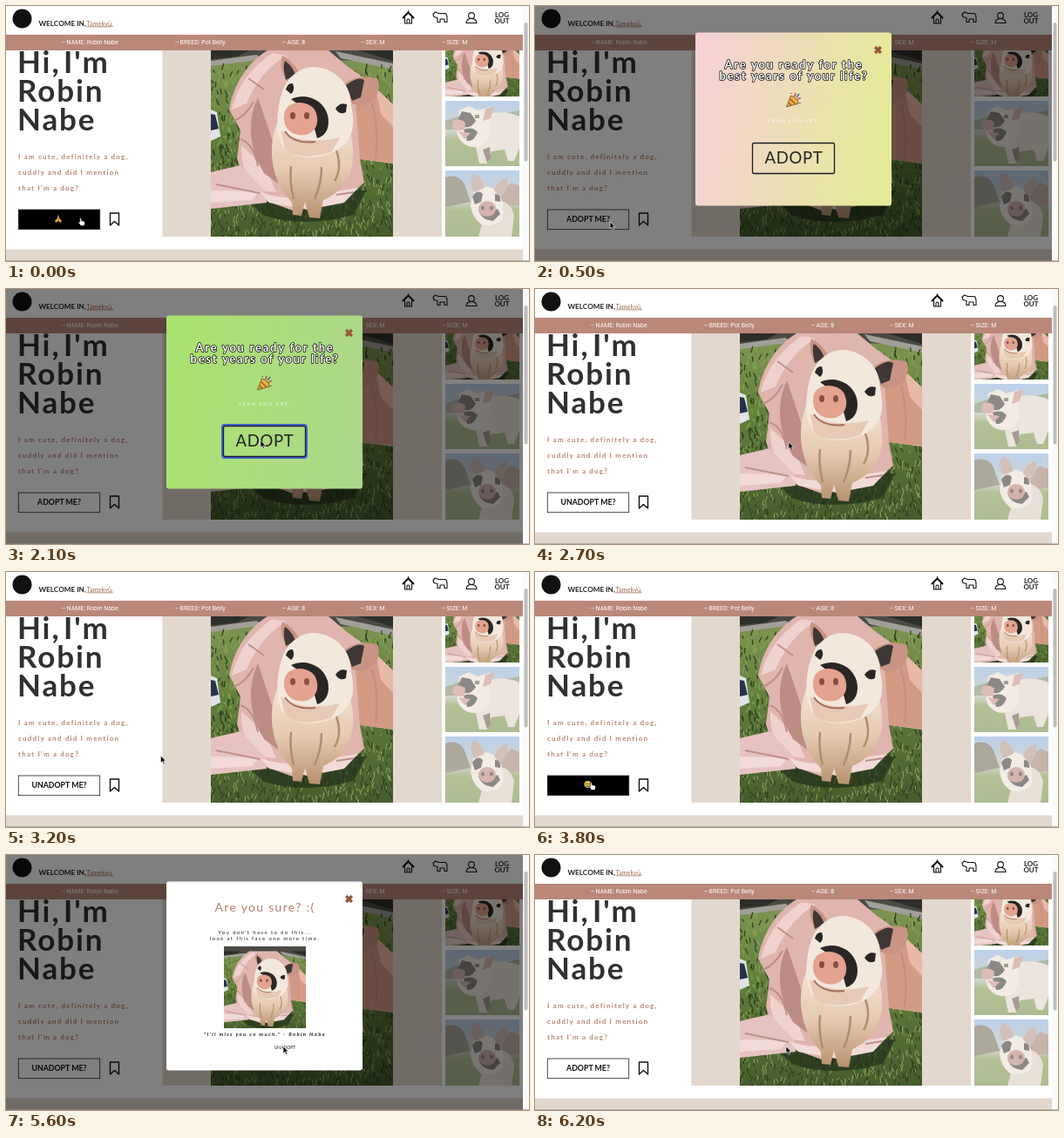
An HTML page for the animation above (6300 ms loop, 600 by 293 pixels).

```html
<!DOCTYPE html>
<html lang="en">
<head>
<meta charset="utf-8">
<title>Pet adoption</title>
<style>
  html, body { margin: 0; width: 100%; height: 100%; overflow: hidden; background: #fff; }
  svg#stage { display: block; width: 100vw; height: 100vh; }
  text { font-family: Lato, sans-serif; fill: #222; white-space: pre; }
  .facts text { font: 7px Roboto, sans-serif; fill: #fff; }
  .name { font-size: 35px; font-weight: 700; letter-spacing: 1.9px; word-spacing: -7px; fill: #303030; }
  .bio text { font-size: 8px; font-weight: 700; letter-spacing: 1.2px; fill: #b98472; }
  .mid { text-anchor: middle; }
  .label { font-size: 8.8px; font-weight: 700; fill: #111; }
  .cheer text { font-size: 13px; font-weight: 700; letter-spacing: 1.75px; fill: #fff; stroke: #111; stroke-width: 1.5px; paint-order: stroke; stroke-linejoin: round; }
  .note { font-size: 6px; letter-spacing: 1.35px; }
  .line { fill: none; stroke: #111; stroke-width: 1.1; stroke-linejoin: round; stroke-linecap: round; }
</style>
</head>
<body>
<svg id="stage" viewBox="0 0 600 293" preserveAspectRatio="none">
  <defs>
    <linearGradient id="party" x2="1" y2=".15">
      <stop id="near" offset="0"/><stop id="far" offset="1"/>
    </linearGradient>
    <linearGradient id="lawn" x2="0" y2="1">
      <stop offset="0" stop-color="#8a9c5c"/><stop offset=".45" stop-color="#64823d"/><stop offset="1" stop-color="#43592b"/>
    </linearGradient>
    <linearGradient id="fur" x2="0" y2="1">
      <stop offset="0" stop-color="#f1e3d3"/><stop offset=".5" stop-color="#e6cbb1"/><stop offset="1" stop-color="#b8916f"/>
    </linearGradient>
    <linearGradient id="sky" x2="0" y2="1">
      <stop offset="0" stop-color="#8fb2e0"/><stop offset=".45" stop-color="#b5bcae"/><stop offset=".6" stop-color="#82974f"/><stop offset="1" stop-color="#788f4c"/>
    </linearGradient>
    <filter id="soft"><feGaussianBlur stdDeviation=".7"/></filter>
    <clipPath id="mainClip"><path d="M235 51h209v214H235z"/></clipPath>
    <clipPath id="thumb1"><path d="M504 51h85v53h-85z"/></clipPath>
    <clipPath id="thumb2"><path d="M504 109h85v75h-85z"/></clipPath>
    <clipPath id="thumb3"><path d="M504 189h85v76h-85z"/></clipPath>
    <clipPath id="faceClip"><path d="M250 105h94v94h-94z"/></clipPath>

    <g id="photo" filter="url(#soft)">
      <path fill="url(#lawn)" d="M230 25h220v250H230z"/>
      <path fill="#4b4a45" d="M230 25h220v50l-40-12-120-3-60 6z"/>
      <path fill="#a19f98" d="M235 63l52-7 10 5-62 8zM378 52l66 14v7l-60-13z"/>
      <path fill="#2c2e2a" d="M235 51h44l-14 7-30 3zM404 51h40v12z"/>
      <path id="blades" fill="none" stroke="#8da65a" stroke-width="1"/>
      <path id="shade" fill="none" stroke="#2f4120" stroke-width="1.3"/>
      <path fill="#dfe3e6" d="M235 119l7 3 4 28-11 5z"/>
      <path fill="#26324b" d="M235 124l5 1 4 16-9 2z"/>
      <path fill="#222f1a" opacity=".7" d="M275 220q65-10 138-8l-14 28q-60 16-105 0z"/>
      <path fill="#dfb5ad" d="M300 51C277 65 261 90 256 119l13 24-4 32 14 42 50 18 58-12 24-20-5-27 38 5V113l-30-28-24-17-20-17z"/>
      <path fill="#efd2ce" d="M306 54c-24 16-40 37-47 65l17-7c11-25 24-42 46-55zM270 160c-1 24 7 43 24 52l16 2-12-28z"/>
      <path fill="#bd8c84" d="M289 105c-13 27-10 60 7 87l16 12-5-45z"/>
      <path fill="#d39a84" d="M401 110l25-14 18 20v64l-38-4z"/>
      <path fill="#e9b9a8" d="M424 94l20 19v26l-14-15z"/>
      <path fill="#e6c3c0" d="M235 191l34-8 28 29 2 14-64 7z"/>
      <path fill="#f1dad7" d="M235 212l55 1-8 10-47 3zM292 214q40 14 92-2l20-3-16 17-42 8-44-8z"/>
      <path fill="none" stroke="#bd8f89" stroke-width="2" d="M261 132q14-5 23-22M241 205l50 10M269 153q15 5 20 31M420 112q8 28 4 62M399 214l-20 3M278 83l18 13"/>
      <path fill="url(#fur)" d="M312 132c-10 24-9 48 0 70 5 12 12 18 16 24l1 14 10 1 4-16 5 18 12 1 4-21c21-9 31-25 34-45 1-19-2-35-9-46z"/>
      <path fill="none" stroke="#b18d6e" stroke-width="2.5" d="M330 222q-5-20-3-38M354 222q8-18 8-37M379 166q7 20-2 35"/>
      <path fill="#c99483" d="M325 91c-10-15-11-27-8-34q13 7 19 19zM386 92c9-10 25-13 41-8 3 13-2 25-17 30-8 2-16-4-24-10z"/>
      <path fill="#3e3735" d="M321 85q-4-17-1-22 8 5 12 16zM390 91q14-11 21-6l-4 20-10 4z"/>
      <path fill="#f3e8dc" d="M323 86c12-15 28-20 45-13 17 7 28 22 28 41 4 20 4 35-11 48-17 14-50 16-64 3-9-9-11-28-9-43 1-12 4-25 11-36z"/>
      <path fill="#e6cab5" d="M315 143q25 18 68 8l-10 17q-38 11-53-4z"/>
      <path fill="#292625" d="M327 107c16-8 37 0 42 18 3 13-1 24-12 27l-5-18q-8-16-25-27z"/>
      <path fill="#e3a38e" d="M320 121c5-13 26-13 34-2 6 11 4 25-10 29-16 3-29-9-24-27z"/>
      <ellipse cx="329" cy="126" rx="3" ry="4" fill="#874d42"/>
      <ellipse cx="345" cy="126" rx="3" ry="4" fill="#874d42"/>
      <path fill="none" stroke="#a9705f" stroke-width="2" d="M320 144q10 15 35 12"/>
      <path fill="#292625" d="M321 96q2-8 8-7 3 8-2 12zM378 118q5-8 13-5l-1 9q-7 4-12-4z"/>
    </g>

    <g id="pets" filter="url(#soft)">
      <g clip-path="url(#thumb2)" opacity=".6">
        <path fill="url(#sky)" d="M504 109h85v75h-85z"/>
        <path fill="#7d8d6c" d="M504 132l20-7 26 2 39-7v22h-85z"/>
        <path fill="#ded4c6" d="M535 130q32-14 54-3v36l-6 15h-7l-4-13-15 2-5 14h-9l-4-19q-10-12-4-32z"/>
        <path fill="#eadfd2" d="M520 120l11-5 10 5 14-4 5 10-6 6q5 18-8 28-15 6-25-6-6-8-2-17z"/>
        <path fill="#423b37" d="M523 121l10 2 6 9q-5 9-15 7l-7-6zM525 142q10-4 16 3-4 11-12 10z"/>
        <path fill="#c79185" d="M513 132q8-4 14 2l-1 8q-10 3-14-3zM519 144l14 2-7 7zM550 118l10-2-4 13-9 3z"/>
        <path fill="#6b5b4e" d="M547 165l8-3 1 13-4 5zM538 125h5v4h-5z"/>
      </g>
      <g clip-path="url(#thumb3)" opacity=".6">
        <path fill="url(#sky)" d="M504 189h85v76h-85z"/>
        <path fill="#766e5a" d="M504 197q15-5 22 8l7 20-29 6z"/>
        <path fill="#a28273" d="M568 213l12-10 9 4v22l-23 1z"/>
        <path fill="#d8cbbd" d="M554 223q25-2 29 18l-3 24h-38z"/>
        <path fill="#eadfd4" d="M537 211q14-8 27 2 10 18 5 32-9 10-24 6-11-9-12-22z"/>
        <path fill="#b6968a" d="M537 214q-7-13 0-22 10 6 12 17zM560 212q5-14 15-14 2 14-8 22z"/>
        <path fill="#3f3935" d="M535 219q6-9 12-3l-2 9-7 3zM561 216q7 0 6 9l-6-1zM542 234q3 12 17 13l8-8-3-6-12 5z"/>
        <ellipse cx="552" cy="233" rx="10" ry="9" fill="#b98377"/>
        <path fill="#493733" d="M545 232a2 2.500 0 1 0 4 0a2 2.500 0 1 0-4 0M555 232a2 2.500 0 1 0 4 0a2 2.500 0 1 0-4 0"/>
      </g>
    </g>
    <path id="close" d="M390.2 47l6.600 7m0-7l-6.600 7" fill="none" stroke="#985b3d" stroke-width="3.400"/>
  </defs>

  <path fill="#fff" d="M0 0h600v293H0z"/>

  <text class="name" x="13" y="77">Hi, I'm</text>
  <text class="name" x="13" y="110">Robin</text>
  <text class="name" x="13" y="143">Nabe</text>
  <g class="bio">
    <text x="14" y="176">I am cute, definitely a dog,</text>
    <text x="14" y="194">cuddly and did I mention</text>
    <text x="14" y="212">that I'm a dog?</text>
  </g>

  <path fill="#e3d8ce" d="M179.500 51h320.500v214H179.500zM0 279.500h593V293H0z"/>
  <g clip-path="url(#mainClip)"><use href="#photo"/></g>
  <g clip-path="url(#thumb1)"><use href="#photo" transform="translate(408.4 10.1) scale(.407)"/></g>
  <use href="#pets"/>

  <rect id="button" x="14.300" y="234" width="93.400" height="22.700" stroke="#222" stroke-width=".8"/>
  <text id="label" class="label mid" x="61" y="247.500"></text>
  <g id="pray" fill="#d9a640"><path d="M60 239.500l1.300 4.500 2.700 3-1.500 2-2.500-2-2.500 2-1.500-2 2.700-3z"/><path d="M60 241v5" stroke="#8d6517" stroke-width=".5"/></g>
  <g id="tear"><circle cx="60.500" cy="244" r="4" fill="#efc14a"/><path d="M59 243v.8m3-.8v.8m-3 2.700q1.500-1.500 3 0" class="line" style="stroke-width:.8"/><circle cx="58.300" cy="246" r="1" fill="#5aa8e0"/></g>
  <path class="line" style="stroke-width:1.4" d="M119.500 238h10v14l-5-4.500-5 4.500z"/>

  <path fill="#fff" d="M0 0h593v33H0z"/>
  <circle cx="18.500" cy="14.500" r="11" fill="#111"/>
  <text x="37.500" y="22.500" font-size="8.200" font-weight="700">WELCOME IN,</text>
  <text x="92.500" y="22.500" font-size="7.300" style="fill:#a06a50" text-decoration="underline">Tamekyū.</text>
  <g class="line">
    <path d="M455.500 13.500l6-6 6 6" style="stroke-width:2"/>
    <path d="M457.500 13v7h8v-7M460 19.500V16q1.500-2 3 0v3.500M461.500 7V5.500"/>
    <path d="M490 9.500l2.500-2.500 4 1.500h7.500q2 1 2 5v5h-3V15h-5v3.500h-3v-5l-4-1z"/>
    <circle cx="534" cy="11" r="3.400"/><path d="M528 19.500q.5-5 6-5t6 5z"/>
  </g>
  <g class="mid" font-size="8" font-weight="700"><text x="569" y="13">LOG</text><text x="569" y="20">OUT</text></g>
  <path fill="#b98879" d="M0 33h593v18H0z"/>
  <g class="facts">
    <text x="64" y="44">-- NAME: Robin Nabe</text>
    <text x="194" y="44">-- BREED: Pot Belly</text>
    <text x="317" y="44">-- AGE: 8</text>
    <text x="407" y="44">-- SEX: M</text>
    <text x="500" y="44">-- SIZE: M</text>
  </g>

  <path id="dim" opacity=".5" d="M0 0h593v293H0z"/>
  <path fill="#fafafa" d="M593 0h7v293h-7z"/>
  <rect x="594.500" y="19" width="4" height="159.500" rx="2" fill="#bdbdbd"/>
  <path fill="#8d8a88" d="M0 292.500h600v.5H0z"/>

  <g id="adopt">
    <rect x="184" y="30.500" width="225" height="199" rx="3" fill="url(#party)"/>
    <use href="#close"/>
    <g class="cheer mid">
      <text x="297" y="71.500">Are you ready for the</text>
      <text x="297" y="85">best years of your life?</text>
    </g>
    <path fill="#e9b23f" stroke="#3a2b1a" stroke-width=".6" d="M288.500 116l5-13q7 2 9 9z"/>
    <path fill="none" stroke="#a45a22" stroke-width="1.500" d="M291 111l3 3.500m-1.500-8l6.500 6.500"/>
    <path fill="none" stroke="#d4483f" stroke-width="1.500" d="M297 104q3-2 1-4m3 8q2-3 4-2"/>
    <path fill="none" stroke="#3c6fc0" stroke-width="1.500" d="M300 105l3-4m-9-1v1m10 10v1"/>
    <text class="mid" x="297" y="134" font-size="5.600" letter-spacing="1.500" style="fill:#fff" opacity=".8">YEAH YOU ARE.</text>
    <rect id="focus" x="248" y="156" width="97" height="38" rx="3" fill="none" stroke="#3f63d8" stroke-width="2"/>
    <rect x="249.500" y="157.500" width="94" height="35" rx="2" fill="none" stroke="#1c1c24" stroke-width="1.300"/>
    <text class="mid" x="297" y="181" font-size="18.500" letter-spacing=".7">ADOPT</text>
  </g>

  <g id="unadopt">
    <rect x="184" y="30.500" width="225" height="217" rx="3" fill="#fff"/>
    <use href="#close"/>
    <text class="mid" x="297" y="65" font-size="14" letter-spacing="1.300" style="fill:#b97f6b">Are you sure? :(</text>
    <text class="note mid" x="297" y="91">You don't have to do this...</text>
    <text class="note mid" x="297" y="97.500">look at this face one more time.</text>
    <g clip-path="url(#faceClip)"><use href="#photo" transform="translate(144.250 87.450) scale(.45)"/></g>
    <text class="note mid" x="297" y="208" font-weight="700" font-style="italic">"I'll miss you so much." - Robin Nabe</text>
    <text class="mid" x="320" y="223" font-size="5">UNADOPT</text>
  </g>

  <g id="cursor">
    <path id="arrow" fill="#000" stroke="#fff" stroke-width=".6" d="M0 0v8l2-1.700 1.300 2.900 1.400-.6-1.300-2.900h2.600z"/>
    <path id="hand" fill="#fff" stroke="#000" stroke-width=".6" d="M-1.500-4q1-1 1.500.2l.8 2.500 3 .8q1 .5.600 1.800L3.800 4.500h-4l-2.800-3.700q0-1.100 1.900-.5z"/>
    <path id="beam" class="line" stroke-width="1" d="M-1.500-4l1.500.8 1.500-.8M0-3.200v6.400M-1.500 4l1.500-.8 1.500.8"/>
  </g>
</svg>
<script>
const LOOP = 6300;
const OPEN_ADOPT = 400, CLOSE_ADOPT = 2300, HOVER = 3300, OPEN_UNADOPT = 4000, CLOSE_UNADOPT = 5900;
// Pointer stops: time, x, y
const stops = [
  [0, 86, 248], [500, 86, 248], [1100, 283, 179], [1400, 283, 179], [2000, 292, 174],
  [2700, 291, 176], [2900, 291, 176], [3500, 65, 246], [4100, 65, 246], [4600, 253, 206],
  [5000, 253, 206], [5500, 318, 220], [5850, 318, 220], [6150, 288, 220], [LOOP, 288, 220]
];
const $ = id => document.getElementById(id);
const show = (id, on) => { $(id).style.display = on ? '' : 'none'; };
const mix = (a, b, p) => a + (b - a) * p;

function grass(seed, count) {
  const random = () => (seed = seed * 16807 % 2147483647) / 2147483647;
  let d = '';
  for (let i = 0; i < count; i++) {
    d += `M${235 + random() * 209} ${72 + random() * 198}l${random() * 6 - 3} ${-3 - random() * 5}`;
  }
  return d;
}
$('blades').setAttribute('d', grass(7, 600));
$('shade').setAttribute('d', grass(91, 600));

function pointer(t) {
  const i = stops.findIndex(s => s[0] > t);
  const [t0, x0, y0] = stops[i - 1], [t1, x1, y1] = stops[i];
  const p = (t - t0) / (t1 - t0), e = p * p * (3 - 2 * p);
  return [mix(x0, x1, e), mix(y0, y1, e)];
}

function draw(t) {
  const adopt = t >= OPEN_ADOPT && t < CLOSE_ADOPT;
  const unadopt = t >= OPEN_UNADOPT && t < CLOSE_UNADOPT;
  const pray = t < OPEN_ADOPT, tear = t >= HOVER && t < OPEN_UNADOPT;
  const hover = pray || tear;
  const owned = t >= CLOSE_ADOPT && t < CLOSE_UNADOPT;
  const [x, y] = pointer(t);
  const beam = unadopt && x > 228 && x < 300 && y > 202 && y < 210;

  show('adopt', adopt);
  show('unadopt', unadopt);
  show('dim', adopt || unadopt);
  show('focus', t >= 2000);
  show('pray', pray);
  show('tear', tear);
  show('label', !hover);
  show('hand', hover);
  show('beam', beam);
  show('arrow', !hover && !beam);
  $('button').setAttribute('fill', hover ? '#000' : '#fff');
  $('label').textContent = owned ? 'UNADOPT ME?' : 'ADOPT ME?';
  $('cursor').setAttribute('transform', `translate(${x} ${y})`);

  const p = (t - 1200) / 900;
  $('near').setAttribute('stop-color', `hsl(${mix(236, 90, p)},68%,${mix(79, 66, p)}%)`);
  $('far').setAttribute('stop-color', `hsl(${mix(278, 92, p)},${mix(58, 50, p)}%,${mix(73, 69, p)}%)`);
}

function tick() {
  draw(performance.now() % LOOP);
  requestAnimationFrame(tick);
}
tick();
</script>
</body>
</html>
```
